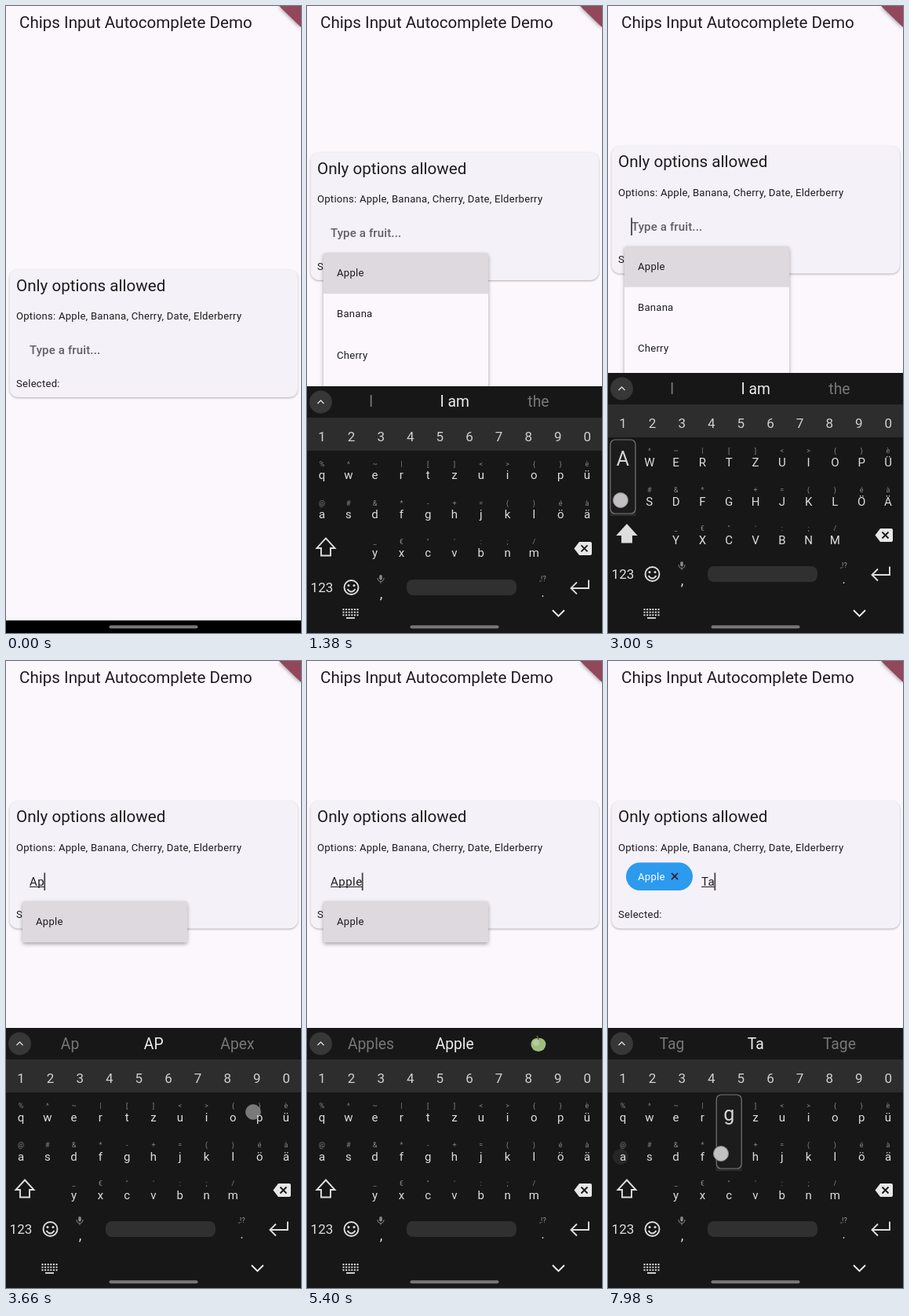
Write an HTML page with a canvas that moves like this. It is 376 by 798 pixels and loops after 8000 ms.

```html
<!DOCTYPE html>
<html lang="en">
<head>
<meta charset="utf-8">
<title>Chips Input Autocomplete Demo</title>
<style>
  html, body { margin: 0; width: 100%; height: 100%; overflow: hidden; background: #fcf7fd; }
  canvas { display: block; width: 100%; height: 100%; }
</style>
</head>
<body>
<canvas id="stage"></canvas>
<script>
const W = 376, H = 798, LOOP = 8000;
const KEYBOARD_TOP = 467, NAV_TOP = 782;
const FOCUS_AT = 840, SLIDE_AT = 947, SLIDE_MS = 600, CHIP_AT = 5700, FADE_MS = 220;
const INK = '#1d1b20', KEY_INK = '#dedede';
const OPTIONS = ['Apple', 'Banana', 'Cherry', 'Date', 'Elderberry'];

const canvas = document.getElementById('stage');
const ctx = canvas.getContext('2d');
const ratio = window.devicePixelRatio || 1;
canvas.width = W * ratio;
canvas.height = H * ratio;

// Letter rows: letters, hints, first key x, baseline
const ROWS = [
  ['qwertzuiopü', '%^~|[]<>{}è', 19, 585.5],
  ['asdfghjklöä', '@#&*-+=()éà', 19, 635.5],
  ['yxcvbnm', '_€"\':;/', 86.6, 684.5],
];
const KEY_STEP = 33.8;

const TAPS = [
  { x: 100, y: 438, down: 90, up: 200 },
  { key: 'shift', x: 24, y: 671, down: 2460, up: 2540 },
  { key: 'a', x: 16, y: 629, down: 3000, up: 3100 },
  { key: 'p', x: 315, y: 574, down: 3480, up: 3570 },
  { key: 'p', x: 315, y: 575, down: 3960, up: 4080 },
  { key: 'l', x: 283, y: 627, down: 4560, up: 4680 },
  { key: 'e', x: 80, y: 576, down: 4980, up: 5100 },
  { key: 'enter', x: 345, y: 722, down: 5580, up: CHIP_AT },
  { key: 'shift', x: 24, y: 671, down: 7020, up: 7110 },
  { key: 't', x: 147, y: 576, down: 7320, up: 7420 },
  { key: 'a', x: 16, y: 631, down: 7660, up: 7780 },
  { key: 'g', x: 144, y: 627, down: 7870, up: 8100 },
];

const SUGGESTIONS = {
  '': ['I', 'I am', 'the'],
  A: ['A', 'And', 'Are'],
  Ap: ['Ap', 'AP', 'Apex'],
  App: ['Apps', 'App', 'Apple'],
  Appl: ['Apply', 'Apple', 'Appl'],
  Apple: ['Apples', 'Apple', null],
  T: ['T', 'The', 'To'],
  Ta: ['Tag', 'Ta', 'Tage'],
};

function text(str, x, y, size, color = INK, { align = 'left', weight = 400, spacing = 0 } = {}) {
  ctx.font = `${weight} ${size}px Roboto, sans-serif`;
  ctx.letterSpacing = spacing + 'px';
  ctx.textAlign = align;
  ctx.fillStyle = color;
  ctx.fillText(str, x, y);
  return ctx.measureText(str).width;
}
const centered = (str, x, y, size, color) => text(str, x, y, size, color, { align: 'center' });
const body = (str, x, y, color) => text(str, x, y, 13.1, color, { spacing: 0.25 });

function rect(x, y, w, h, color) {
  ctx.fillStyle = color;
  ctx.fillRect(x, y, w, h);
}
function round(x, y, w, h, r, color) {
  ctx.beginPath();
  ctx.roundRect(x, y, w, h, r);
  ctx.fillStyle = color;
  ctx.fill();
}
function circle(x, y, r, color) {
  ctx.beginPath();
  ctx.arc(x, y, r, 0, 7);
  ctx.fillStyle = color;
  ctx.fill();
}
function line(path, color = KEY_INK, width = 1.9) {
  ctx.strokeStyle = color;
  ctx.lineWidth = width;
  ctx.stroke(new Path2D(path));
}
function shadowed(blur, dy, alpha, draw) {
  ctx.save();
  ctx.shadowColor = `rgba(0,0,0,${alpha})`;
  ctx.shadowBlur = blur * ratio;
  ctx.shadowOffsetY = dy * ratio;
  draw();
  ctx.restore();
}

// cubic-bezier(.4, 0, .2, 1)
function ease(p) {
  if (p <= 0) return 0;
  if (p >= 1) return 1;
  let lo = 0, hi = 1, s;
  for (let i = 0; i < 20; i++) {
    s = (lo + hi) / 2;
    const x = 1.2 * s * (1 - s) ** 2 + 0.6 * s * s * (1 - s) + s ** 3;
    if (x < p) lo = s; else hi = s;
  }
  return s * s * (3 - 2 * s);
}

function stateAt(t) {
  const state = { typed: '', shift: false, chip: t >= CHIP_AT, focused: t >= FOCUS_AT, lastEdit: FOCUS_AT };
  for (const { key, up } of TAPS) {
    if (!key || up > t) continue;
    if (key === 'shift') { state.shift = true; continue; }
    if (key === 'enter') state.typed = '';
    else state.typed += state.shift ? key.toUpperCase() : key;
    state.shift = false;
    state.lastEdit = up;
  }
  state.cursor = state.focused && (t - state.lastEdit) % 1000 < 500;
  state.keyboard = H - (H - KEYBOARD_TOP) * ease((t - SLIDE_AT) / SLIDE_MS);
  return state;
}

function drawBanner() {
  shadowed(5, 1, 0.45, () => {
    ctx.fillStyle = '#93475a';
    ctx.fill(new Path2D('M348 0 H376 V27 Z'));
  });
}

function drawCard(s) {
  const top = 178 + (Math.min(s.keyboard, NAV_TOP) - KEYBOARD_TOP) / 2;
  const fieldX = s.chip ? 119 : 30;
  ctx.save();
  ctx.translate(0, top);
  shadowed(2.5, 1, 0.3, () => round(4.5, 0, 367.5, 162.5, 11, '#f5f1f8'));
  text('Only options allowed', 13, 27.3, 20.6);
  body('Options: ' + OPTIONS.join(', '), 13, 63.8);
  body('Selected:', 13, 149.3);

  if (s.chip) {
    round(23, 78.5, 85, 35.5, 17.75, '#2c9aed');
    body('Apple', 38, 100.5, '#fff');
    line('M81 92 L89 100 M89 92 L81 100', INK, 1.7);
  }

  let width = 0;
  if (s.typed) {
    width = text(s.typed, fieldX, 107.5, 15, INK, { spacing: 0.47 });
    rect(fieldX, 109, width, 1, INK);
  } else {
    text('Type a fruit...', fieldX, 107.5, 15, '#625e66', { weight: 500, spacing: 0.14 });
  }
  if (s.cursor) rect(fieldX + width - 0.8, 91.5, 1.8, 22.5, '#47434a');

  if (s.focused) drawOptions(s.typed, fieldX - 9);
  ctx.restore();
}

function drawOptions(typed, x) {
  const matches = OPTIONS.filter(o => o.toLowerCase().includes(typed.toLowerCase())).slice(0, 4);
  if (!matches.length) return;
  const y = 127.5, row = 52.2, height = row * matches.length;
  shadowed(5, 2.5, 0.35, () => round(x, y, 210, height, 2.5, '#fcf7fd'));
  round(x, y, 210, row, matches.length > 1 ? [2.5, 2.5, 0, 0] : 2.5, '#ded8df');
  matches.forEach((name, i) => body(name, x + 17, y + i * row + 30.2));
}

function drawApple(x, y) {
  round(x - 9.5, y - 7, 19, 17, [8, 8, 9.5, 9.5], '#9dbd80');
  circle(x - 3, y - 1, 4, '#b3cd99');
  line(`M${x} ${y - 5} Q${x} ${y - 8} ${x - 2} ${y - 10}`, '#6d5a4a', 1.6);
}

function drawBottomRow() {
  text('123', 4.5, 729, 17, KEY_INK, { spacing: 0.1 });
  ctx.beginPath();
  ctx.arc(56.5, 723, 9, 0, 7);
  ctx.strokeStyle = KEY_INK;
  ctx.lineWidth = 1.9;
  ctx.stroke();
  circle(53, 720.5, 1.5, KEY_INK);
  circle(60, 720.5, 1.5, KEY_INK);
  line('M51.5 725 Q56.5 732 61.5 725');
  round(92.2, 707, 3.6, 6.5, 1.8, '#888');
  line('M90 711 Q90 715.5 94 715.5 Q98 715.5 98 711 M94 715.5 V718', '#888', 1);
  centered(',', 94.5, 737, 18, KEY_INK);
  round(127, 713, 140, 20, 8, '#303030');
  centered(',!?', 300.5, 715, 9, '#999');
  centered('.', 300.5, 735, 16, KEY_INK);
  line('M359 713.5 V724 H337 M344 716.5 L336.5 724 L344 731.5');
}

function drawPopup(key, shift) {
  for (const [letters, , x0, baseline] of ROWS) {
    const i = letters.indexOf(key);
    if (i < 0) continue;
    const x = x0 + i * KEY_STEP, top = baseline - 83.5;
    rect(x - 16.5, top + 90, 33, 7, '#2b2b2b');
    round(x - 16, top, 32, 94, 6, '#1c1c1c');
    ctx.strokeStyle = '#777';
    ctx.lineWidth = 1.2;
    ctx.stroke();
    centered(shift ? key.toUpperCase() : key, x, top + 33, 25, '#d8d8d8');
  }
}

function drawKeyboard(s, t) {
  ctx.save();
  ctx.translate(0, s.keyboard - KEYBOARD_TOP);
  rect(0, KEYBOARD_TOP, W, H, '#171717');
  rect(0, 507, W, 42, '#2d2d2d');

  circle(17.5, 487, 14.5, '#373737');
  line('M13.5 489 L17.5 485 L21.5 489', KEY_INK, 1.3);
  SUGGESTIONS[s.typed].forEach((word, i) => {
    const x = 81.5 + i * 106.7;
    if (word) centered(word, x, 493.5, 19.3, i === 1 ? '#ededed' : '#777');
    else drawApple(x, 487);
  });

  [...'1234567890'].forEach((digit, i) => centered(digit, 19 + i * 37.6, 537, 17, '#d0d0d0'));
  for (const [letters, hints, x0, baseline] of ROWS) {
    [...letters].forEach((letter, i) => {
      const x = x0 + i * KEY_STEP;
      centered(hints[i], x, baseline - 16.5, 9, '#888');
      centered(s.shift ? letter.toUpperCase() : letter, x, baseline, 15, KEY_INK);
    });
  }

  const arrow = 'M24 660.5 L35.5 673 H30 V682.5 H18 V673 H12.5 Z';
  line(arrow);
  if (s.shift) {
    ctx.fillStyle = KEY_INK;
    ctx.fill(new Path2D(arrow));
  }
  ctx.fillStyle = '#e8e8e8';
  ctx.fill(new Path2D('M347 665 H361 Q363 665 363 667 V680 Q363 682 361 682 H347 L340.5 673.5 Z'));
  line('M349.5 669.5 L357.5 677.5 M357.5 669.5 L349.5 677.5', '#171717', 1.8);
  drawBottomRow();

  const pressed = TAPS.find(tap => tap.key && tap.down <= t && t < tap.up);
  if (pressed) drawPopup(pressed.key, s.shift);
  ctx.restore();
}

function drawNavigation(shown) {
  if (shown) {
    for (let row = 0; row < 3; row++)
      for (let col = 0; col < 6; col++) rect(45.5 + col * 3.6, 767 + row * 3.6, 2, 2, KEY_INK);
    rect(50, 778, 11, 1.8, KEY_INK);
    line('M313 769 L320.5 776.5 L328 769', '#f0f0f0', 1.8);
  }
  round(131.5, 788.3, 113, 4, 2, '#777');
}

function drawTaps(t) {
  for (const { x, y, down, up } of TAPS) {
    if (t < down || t > up + FADE_MS) continue;
    ctx.globalAlpha = t < up ? 1 : 1 - (t - up) / FADE_MS;
    circle(x, y, 9.5, '#c2c0c2');
    ctx.strokeStyle = '#8a8a8a';
    ctx.lineWidth = 1;
    ctx.stroke();
  }
  ctx.globalAlpha = 1;
}

function draw(t) {
  const s = stateAt(t);
  ctx.setTransform(ratio, 0, 0, ratio, 0, 0);
  rect(0, 0, W, H, '#fcf7fd');
  text('Chips Input Autocomplete Demo', 17, 28, 20.6);
  drawBanner();
  drawCard(s);
  rect(0, NAV_TOP, W, H - NAV_TOP, '#000');
  if (s.keyboard < H) drawKeyboard(s, t);
  drawNavigation(s.keyboard < H);
  drawTaps(t);
}

const start = performance.now();
function tick() {
  draw((performance.now() - start) % LOOP);
  requestAnimationFrame(tick);
}
tick();
</script>
</body>
</html>
```
